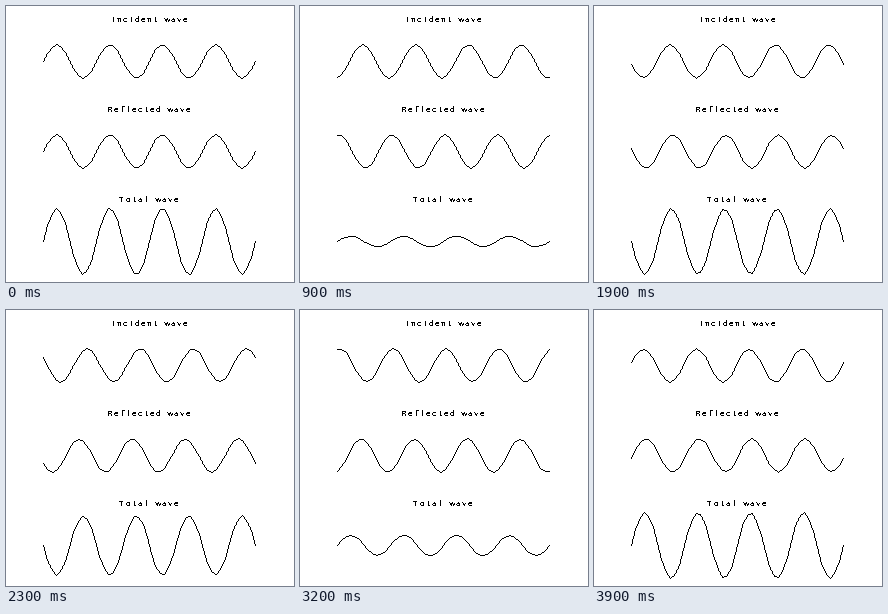
Recreate the animation shown at these times as a matplotlib script. Size 288 by 276 pixels, loop 4000 ms.

```python
import numpy as np
import matplotlib.pyplot as plt
from matplotlib.animation import FuncAnimation

W, H, DPI = 288, 276, 72
FRAMES, INTERVAL = 40, 100
LEFT, RIGHT, CYCLES, SAMPLES = 37, 249, 4, 50
AMP = 16.6
PITCH = 6  # typewriter letter spacing in pixels
ROWS = [("Incident wave", 55, 16), ("Reflected wave", 145, 106), ("Total wave", 235, 196)]

plt.rcParams["text.antialiased"] = False

fig = plt.figure(figsize=(W / DPI, H / DPI), dpi=DPI, facecolor="white")
ax = fig.add_axes([0, 0, 1, 1])
ax.axis("off")

canvas = ax.imshow(np.full((H, W), 255), cmap="gray", vmin=0, vmax=255,
                   extent=(0, W, H, 0), interpolation="nearest", aspect="auto")


def typewrite(text, cx, baseline):
    left = cx - PITCH * len(text) / 2
    for n, letter in enumerate(text):
        ax.text(left + PITCH * (n + 0.5), baseline, letter, family="DejaVu Serif",
                size=8, color="black", ha="center", va="baseline")


for title, _, baseline in ROWS:
    typewrite(title, 143, baseline)

u = np.linspace(0, 1, SAMPLES)
kx = 2 * np.pi * CYCLES * u
x = np.rint(LEFT + (RIGHT - LEFT) * u).astype(int)


def draw_curve(pixels, y):
    """Draw a one-pixel polyline without smoothing."""
    for x0, y0, x1, y1 in zip(x, y, x[1:], y[1:]):
        n = max(abs(x1 - x0), abs(y1 - y0)) + 1
        cols = np.rint(np.linspace(x0, x1, n)).astype(int)
        rows = np.rint(np.linspace(y0, y1, n)).astype(int)
        pixels[rows, cols] = 0


def update(i):
    wt = 2 * np.pi * i / FRAMES
    incident = np.sin(kx - wt)
    reflected = np.sin(kx + wt)
    pixels = np.full((H, W), 255)
    for wave, (_, mid, _) in zip((incident, reflected, incident + reflected), ROWS):
        draw_curve(pixels, np.rint(mid - AMP * wave).astype(int))
    canvas.set_data(pixels)
    return [canvas]


anim = FuncAnimation(fig, update, frames=FRAMES, interval=INTERVAL,
                     repeat=True, repeat_delay=0)
plt.show()
```
